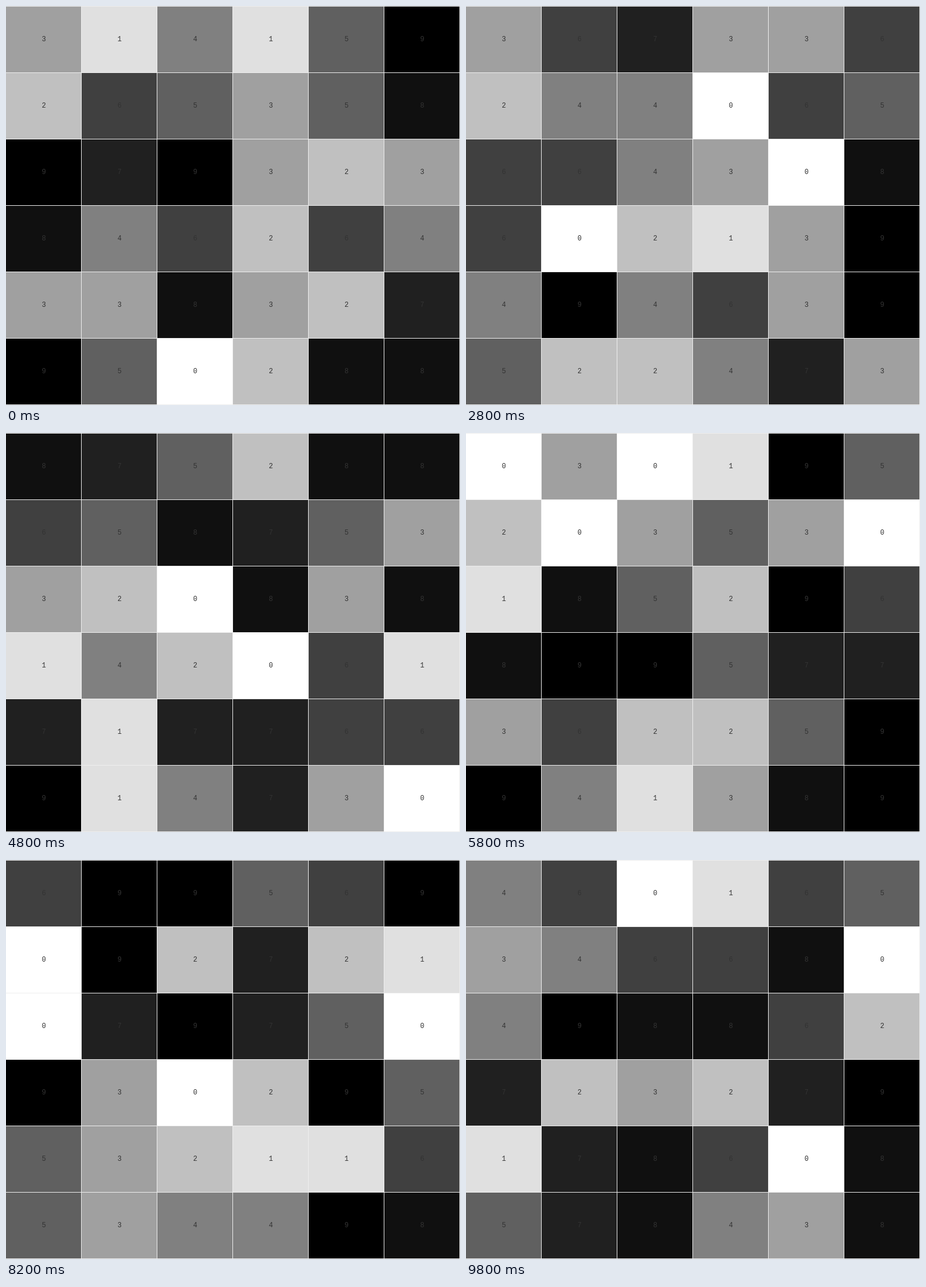
These frames come from a looping animation (786 by 691 pixels, 10000 ms). An HTML page:

```html
<!DOCTYPE html>
<html lang="en">
<head>
<meta charset="utf-8">
<title>Digits of pi</title>
<style>
  html, body {
    margin: 0;
    width: 100%;
    height: 100%;
    overflow: hidden;
    background: #eee;
  }
  #grid {
    display: grid;
    grid-template: repeat(6, 114px) / repeat(6, 130px);
    gap: 1px;
    padding: 1px 1px 1px 0;
    width: 785px;
    color: #333;
    font: 12px "Liberation Mono", "Courier New", monospace;
  }
  #grid div {
    box-sizing: border-box;
    display: flex;
    align-items: center;
    justify-content: center;
    padding-left: 1px;
  }
</style>
</head>
<body>
<div id="grid"></div>
<script>
const CELLS = 36, PAGES = 50, PAGE_MS = 200;
const SHADES = ['#fff', '#e0e0e0', '#c0c0c0', '#a0a0a0', '#808080',
                '#606060', '#404040', '#202020', '#101010', '#000'];

// Machin: pi = 16 arctan(1/5) - 4 arctan(1/239), in fixed point
function arctanInverse(x, unit) {
  let power = unit / x, sum = power, sign = -1n;
  for (let n = 3n; power; n += 2n, sign = -sign) {
    power /= x * x;
    sum += sign * (power / n);
  }
  return sum;
}

function piDigits(count) {
  const unit = 10n ** BigInt(count + 20);
  const pi = 16n * arctanInverse(5n, unit) - 4n * arctanInverse(239n, unit);
  return pi.toString().slice(0, count);
}

const digits = piDigits(CELLS * PAGES);
const grid = document.getElementById('grid');
const cells = Array.from({ length: CELLS }, () =>
  grid.appendChild(document.createElement('div')));
let shown = -1;

function draw() {
  const page = Math.floor(performance.now() / PAGE_MS) % PAGES;
  if (page !== shown) {
    shown = page;
    cells.forEach((cell, i) => {
      const digit = digits[page * CELLS + i];
      cell.textContent = digit;
      cell.style.background = SHADES[digit];
    });
  }
  requestAnimationFrame(draw);
}
draw();
</script>
</body>
</html>
```
